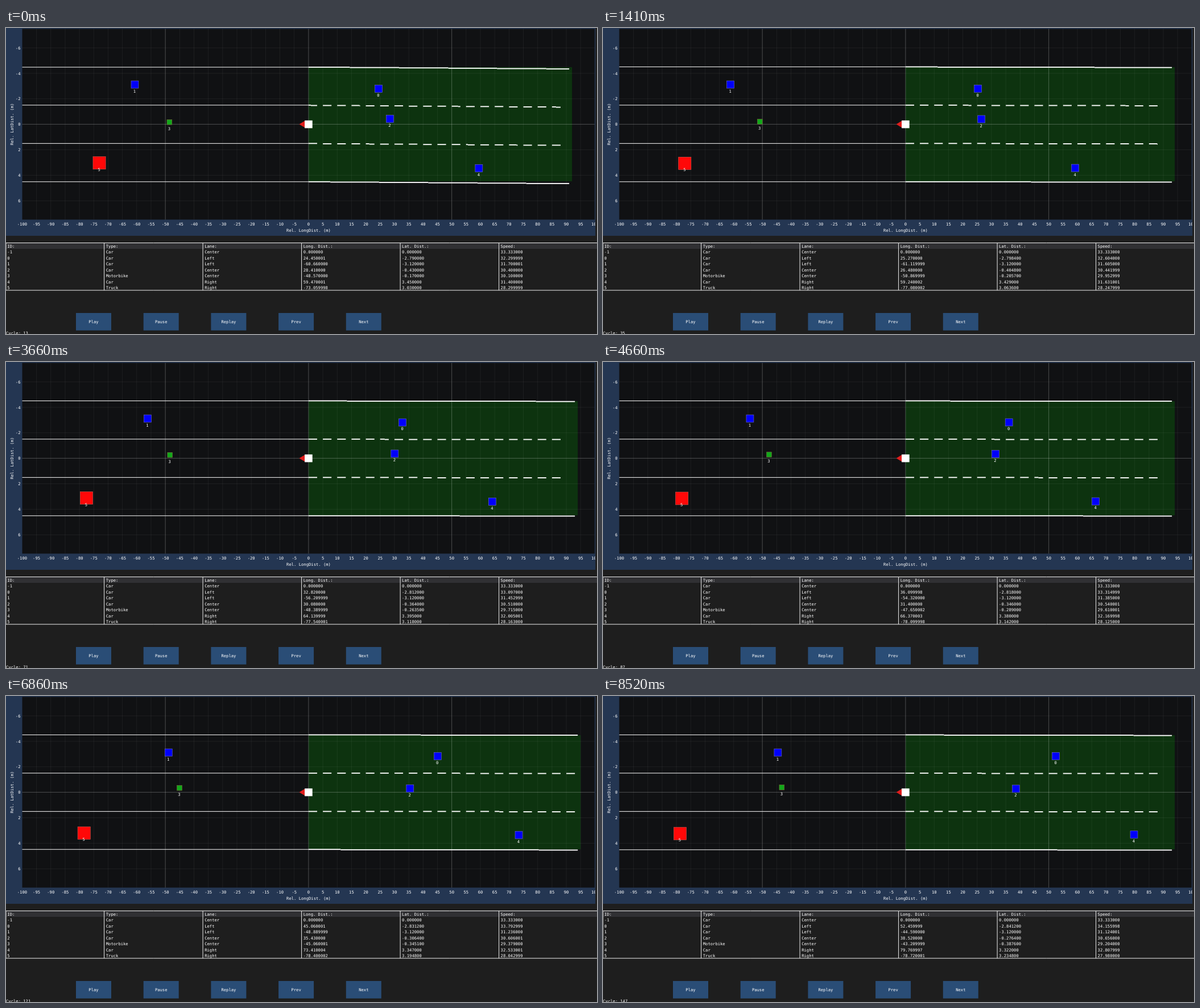
Recreate the animation shown at these times as an HTML page with a canvas. Size 1039 by 539 pixels, loop 8590 ms.

```html
<!DOCTYPE html>
<html lang="en">
<head>
<meta charset="utf-8">
<title>Relative traffic view</title>
<style>
  html, body { margin: 0; width: 100%; height: 100%; overflow: hidden; background: #1e1e1e; }
  canvas { display: block; }
</style>
</head>
<body>
<canvas id="view" width="1039" height="539"></canvas>
<script>
const ctx = document.getElementById('view').getContext('2d');
const W = 1039, H = 539, LOOP = 8590, STEP = 66.55, LAST = 128;
const PLOT = { left: 28.5, top: 1.5, right: 1034.8, bottom: 337.5 };
const UNIT = 0.619;        // size of one interface pixel on the stage
const METRE_X = 5.035;     // stage pixels per metre, lengthwise
const METRE_Y = 36.267;    // interface pixels per metre, sideways

// Distance: start + drift * n + accel * n^2, plus a start-up offset that dies away
const vehicles = [
  { type: 'Car', lane: 'Left', start: 21.25, drift: 0.182, accel: 5e-4, settle: 3.25,
    lat: -2.79, veer: -0.0004, speed: 32.3, gain: 0.0145 },
  { type: 'Car', lane: 'Left', start: -63.85, drift: 0.127, accel: 2e-4, settle: 3.24,
    lat: -3.12, veer: 0, speed: 31.7, gain: -0.0045 },
  { type: 'Car', lane: 'Center', start: 24.1, drift: 0.102, accel: 1e-4, settle: 4.36,
    lat: -0.43, veer: 0.0012, speed: 30.4, gain: 0.002 },
  { type: 'Motorbike', lane: 'Center', start: -52.6, drift: 0.0755, accel: 0, settle: 4.08,
    lat: -0.17, veer: -0.0017, speed: 30.1, gain: -0.007 },
  { type: 'Car', lane: 'Right', start: 57.6, drift: 0.0755, accel: 7.8e-4, settle: 1.92,
    lat: 3.45, veer: -0.001, speed: 31.4, gain: 0.011 },
  { type: 'Truck', lane: 'Right', start: -76.95, drift: -0.0117, accel: 0, settle: 3.94,
    lat: 3.03, veer: 0.0016, speed: 28.3, gain: -0.0025 }
];

const looks = {
  Car: { size: 13.6, fill: '#0000fa', edge: '#7070c8' },
  Truck: { size: 22.8, fill: '#ff0808', edge: '#c85a50' },
  Motorbike: { size: 9.4, fill: '#12a81a', edge: '#7a6a3c' }
};

const toX = m => 531.9 + METRE_X * m;
const unitY = m => 274 + METRE_Y * m;
const toY = m => UNIT * unitY(m);
const wave = (n, period) => Math.cos(2 * Math.PI * n / period);

const viewRange = n => Math.round(92 + 0.014 * n - 1.15 * wave(n, 31.5));
const laneShift = n => 0.01 * Math.round(wave(n, 30.3));
// Interface pixels of lane drop per 1000 stage pixels; one brief swing the other way
const heading = n => 3 + 8.6 * Math.exp(-n / 8) - 7 * Math.exp(-(((n - 85) / 9) ** 2));
const egoSway = n => 0.35 * (wave(n - 55, 60) - 1);

const stateAt = (v, n) => ({
  long: v.start + v.drift * n + v.accel * n * n + v.settle * Math.exp(-n / 13) + egoSway(n),
  lat: v.lat + v.veer * n,
  speed: v.speed + v.gain * n
});

// Values are stored as single-precision floats, hence digits like .469999
const single = (v, digits) => Math.fround(Number(v.toFixed(digits))).toFixed(6);

function rect(x, y, w, h, color) {
  ctx.fillStyle = color;
  ctx.fillRect(x, y, w, h);
}

function line(x1, y1, x2, y2, color) {
  ctx.strokeStyle = color;
  ctx.lineWidth = 1;
  ctx.beginPath();
  ctx.moveTo(x1, y1);
  ctx.lineTo(x2, y2);
  ctx.stroke();
}

function text(str, x, y, align = 'left') {
  ctx.font = '7.2px "DejaVu Sans Mono", monospace';
  ctx.textAlign = align;
  ctx.fillStyle = '#fff';
  ctx.fillText(str, x, y + 2.7);
}

function drawGrid() {
  const { left, top, right, bottom } = PLOT;
  const shade = major => `rgba(255,255,255,${major ? 0.25 : 0.06})`;
  for (let m = -95; m < 100; m += 5) line(toX(m), top, toX(m), bottom, shade(m % 50 === 0));
  for (let m = -6; m <= 6; m += 2) line(left, toY(m), right, toY(m), shade(m === 0));
}

function drawAxes() {
  ctx.save();
  ctx.beginPath();
  ctx.rect(0, 0, 1036, 366);
  ctx.clip();
  for (let m = -100; m <= 100; m += 5) text(String(m), toX(m), 345, 'center');
  for (let m = -6; m <= 6; m += 2) text(String(m), 25.5, toY(m), 'right');
  text('Rel. LongDist. (m)', 532, 356, 'center');
  ctx.translate(10.5, 169.5);
  ctx.rotate(-Math.PI / 2);
  text('Rel. LatDist. (m)', 0, 0, 'center');
  ctx.restore();
}

function drawRoad(n) {
  const range = viewRange(n), slope = heading(n) / 1000 * METRE_X;

  for (let lat = -4.5; lat <= 4.5; lat += 3) {
    // Lane lines snap to whole interface pixels
    const y0 = unitY(lat + laneShift(n));
    const snap = m => Math.floor(y0 + slope * m);
    const stroke = (from, to) => {
      let start = from;
      for (let m = from; m < to; m += 0.2) {
        const next = Math.min(m + 0.2, to);
        if (next === to || snap(next) !== snap(m)) {
          rect(toX(start), UNIT * (snap(m) - 1), toX(next) - toX(start), UNIT * 3, '#fff');
          start = next;
        }
      }
    };

    const y = UNIT * (snap(0) + 0.5);
    line(PLOT.left, y, toX(0), y, '#fff');
    if (Math.abs(lat) > 4) stroke(0, range);
    else for (let m = 0; m + 3 < range; m += 5) stroke(m, m + 3);
  }
}

function drawVehicle(v, id, n) {
  const { long, lat } = stateAt(v, n), { size, fill, edge } = looks[v.type];
  const x = toX(long), y = toY(lat), s = size - UNIT;
  rect(x - s / 2, y - s / 2, s, s, fill);
  ctx.strokeStyle = edge;
  ctx.lineWidth = UNIT;
  ctx.strokeRect(x - s / 2, y - s / 2, s, s);
  text(String(id), x - 0.5, y + 11.3, 'center');
}

function drawEgo() {
  const x = toX(0), y = toY(0);
  ctx.fillStyle = '#e01c1c';
  ctx.beginPath();
  ctx.moveTo(x - 16.4, y);
  ctx.lineTo(x - 6.5, y - 6);
  ctx.lineTo(x - 6.5, y + 6);
  ctx.fill();
  rect(x - 6.8, y - 6.8, 13.6, 13.6, '#fff');
}

function drawTable(n) {
  const rows = [
    ['ID:', 'Type:', 'Lane:', 'Long. Dist.:', 'Lat. Dist.:', 'Speed:'],
    ['-1', 'Car', 'Center', '0.000000', '0.000000', single(33.333, 3)],
    ...vehicles.map((v, id) => {
      const s = stateAt(v, n);
      return [String(id), v.type, v.lane, single(s.long, 2), single(s.lat, 4), single(s.speed, 3)];
    })
  ];
  rect(0, 379, W, 10, '#303033');
  line(0, 378.5, W, 378.5, '#f0f0f0');
  line(0, 462, W, 462, '#f0f0f0');
  for (let i = 0; i < 6; i++) {
    const x = Math.max(0, 173.5 * i - 0.9);
    line(x, 378.5, x, 462, '#f0f0f0');
  }
  rows.forEach((row, r) => row.forEach((cell, c) => text(cell, 2.3 + 173.45 * c, 384.1 + 10.5 * r)));
}

function drawButtons() {
  ['Play', 'Pause', 'Replay', 'Prev', 'Next'].forEach((label, i) => {
    const x = Math.min(123 + 118.7 * i, 118 + 123.7 * i + 5 * (i === 0));
    rect(x, 502, 62, 30.7, '#2a4d76');
    text(label, x + 31, 517.5, 'center');
  });
}

function draw(ms) {
  const n = Math.min(LAST, Math.floor((ms % LOOP + 7) / STEP));
  rect(0, 0, W, H, '#1e1e1e');
  rect(0, 0, 1036.2, 366, '#243652');
  rect(PLOT.left, PLOT.top, PLOT.right - PLOT.left, PLOT.bottom - PLOT.top, '#101113');
  rect(toX(0), 69, METRE_X * (viewRange(n) + 1), 201, '#0d330f');
  drawGrid();
  drawRoad(n);
  drawEgo();
  vehicles.forEach((v, id) => drawVehicle(v, id, n));
  drawAxes();
  drawTable(n);
  drawButtons();
  text('Cycle: ' + (13 + Math.round(n * 1.05)), 0, 537.3);
}

const begin = performance.now();
function tick() {
  draw(performance.now() - begin);
  requestAnimationFrame(tick);
}
tick();
</script>
</body>
</html>
```
